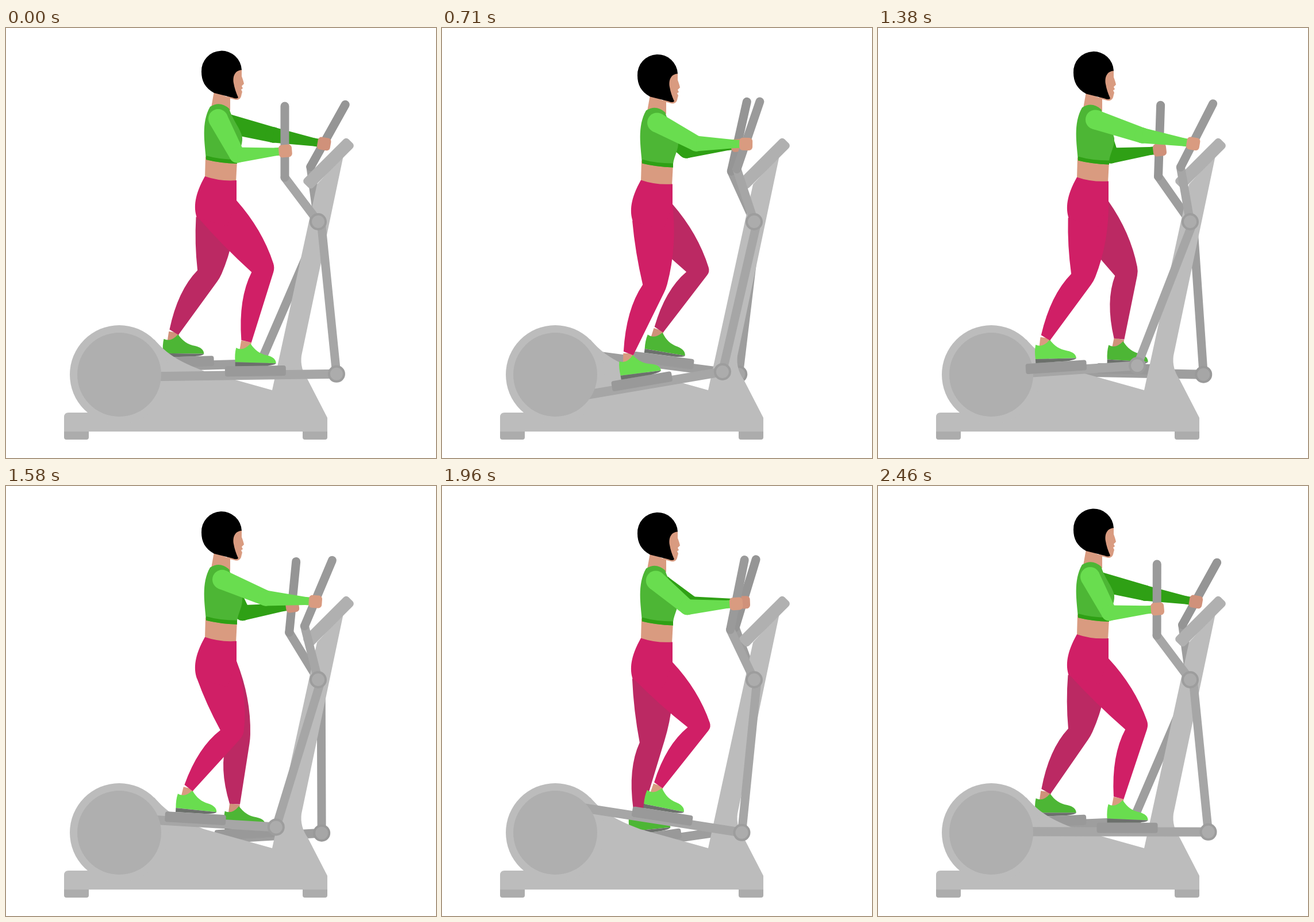
Animation of 748 by 748 pixels, one loop 2.5 s. Source, as an HTML page with a canvas:

```html
<!DOCTYPE html>
<html lang="en">
<head>
<meta charset="utf-8">
<title>Elliptical trainer</title>
<style>
html, body { margin: 0; width: 100%; height: 100%; overflow: hidden; background: #fff; }
canvas { display: block; }
</style>
</head>
<body>
<canvas id="stage" width="748" height="748"></canvas>
<script>
const ctx = document.getElementById('stage').getContext('2d');
const LOOP = 2500, ARM = 266.7, PIVOT = [543, 337], WHEEL = [197, 603];
const TIMES = [0, 330, 710, 1045, 1380, 1750, 2170];

// Poses at TIMES: lever angle (degrees), rod slope, knee and elbow positions.
const near = {
  lever: [6.67, 0.9, -12.1, -20.5, -20.4, -11.4, 1.3],
  slope: [-.014, -.137, -.17, -.15, -.067, .146, .118],
  kneeX: [447, 410, 369, 351, 355, 425, 459],
  kneeY: [421, 442, 450, 437, 434, 425, 416],
  elbowX: [402, 412, 442, 460, 460, 442, 412],
  elbowY: [221, 216, 201, 188, 187, 203, 217],
  shoulderX: [369, 370, 374, 378, 378, 374, 370], shoulderY: 158, reach: -141,
  pants: '#d01f66', shoe: '#69dd4f', sleeve: '#69dd4f', skin: '#d99b80',
  bar: '#a6a6a6', grip: '#9a9a9a', ring: '#9d9d9d', hub: '#acacac'
};
const far = {
  lever: [-22.5, -18.1, -6, 5, 4.8, -3.3, -17],
  slope: [-.03, .06, .13, .09, .02, -.115, -.14],
  kneeX: [352, 396, 445, 453, 432, 381, 353],
  kneeY: [428, 440, 424, 418, 427, 452, 440],
  elbowX: [465, 450, 425, 405, 405, 420, 450],
  elbowY: [186, 193, 213, 221, 222, 217, 194],
  shoulderX: [384, 384, 384, 384, 384, 384, 384], shoulderY: 166, reach: -133,
  pants: '#bb2963', shoe: '#4db635', sleeve: '#2fa015', skin: '#d0917a',
  bar: '#9e9e9e', grip: '#959595', ring: '#999', hub: '#a6a6a6'
};

const SHOE = new Path2D('M-33 -41Q-21 -34 -8 -48C0 -36 8 -30 21 -27Q36 -23 36 -13L-35 -16Q-36 -30 -33 -41Z');
const SOLE = new Path2D('M-35 -16L36 -13Q35 -10 19 -9L-35 -9Z');
const FRAME = new Path2D(
  'M145 669L197 603L258 542C280 567 300 580 345 597L463 630L541 272L587 222L514 570' +
  'Q511 592 525 612L559 678V702H101V677Q101 669 109 669Z');
const FEET = new Path2D('M101 702H144V712Q144 716 140 716H105Q101 716 101 712ZM516 702H559V712Q559 716 555 716H520Q516 716 516 712Z');
const NECK = new Path2D('M362 110L357 138Q372 150 390 143V122Z');
const FACE = new Path2D('M400 70L410 72V84Q413 92 414 97L410 101L412 105L409 107L411 111Q410 114 409 119Q407 125 400 125L385 121L375 90Z');
const HAIR = new Path2D('M340 76A35 35 0 0 1 410 73C398 74 394 84 396 96Q398 108 404 121Q401 124 394 121L362 113C346 104 340 92 340 76Z');
const WAIST = new Path2D('M347 224L402 230L400 268Q370 272 346 260Z');
const SHIRT = new Path2D('M355 137Q372 126 388 140C394 160 408 175 411 190C412 205 404 215 402 230V236Q372 235 348 229C346 200 339 165 355 137Z');
const HEM = new Path2D('M348 222Q372 229 402 229V236Q372 235 348 229Z');
const HIPS = new Path2D('M346 258Q372 267 401 265V301L385 345L332 330C326 312 328 290 346 258Z');

// Smooth cyclic interpolation of values given at TIMES.
function at(values, t) {
  const n = TIMES.length;
  const time = i => TIMES[(i + n) % n] + LOOP * Math.floor(i / n);
  const value = i => values[(i + n) % n];
  const tangent = i => (value(i + 1) - value(i - 1)) / (time(i + 1) - time(i - 1));
  let i = n - 1;
  while (TIMES[i] > t) i--;
  const h = time(i + 1) - time(i), u = (t - time(i)) / h, w = 1 - u;
  return w * w * (1 + 2 * u) * value(i) + u * u * (3 - 2 * u) * value(i + 1) +
    h * u * w * (w * tangent(i) - u * tangent(i + 1));
}

const add = (p, d, k = 1) => [p[0] + d[0] * k, p[1] + d[1] * k];
const mid = (p, q) => [(p[0] + q[0]) / 2, (p[1] + q[1]) / 2];
const unit = (p, q) => {
  const l = Math.hypot(q[0] - p[0], q[1] - p[1]);
  return [(q[0] - p[0]) / l, (q[1] - p[1]) / l];
};
const forward = d => [d[1], -d[0]];
const turn = ([x, y], a, o) =>
  [o[0] + x * Math.cos(a) - y * Math.sin(a), o[1] + x * Math.sin(a) + y * Math.cos(a)];

function fill(path, color) {
  ctx.fillStyle = color;
  ctx.fill(path);
}

function disc([x, y], r, color) {
  ctx.fillStyle = color;
  ctx.beginPath();
  ctx.arc(x, y, r, 0, 7);
  ctx.fill();
}

function line(p, q, width, color, cap = 'round') {
  ctx.strokeStyle = color;
  ctx.lineWidth = width;
  ctx.lineCap = cap;
  ctx.beginPath();
  ctx.moveTo(...p);
  ctx.lineTo(...q);
  ctx.stroke();
}

function block(center, angle, w, h, r, color) {
  ctx.save();
  ctx.translate(...center);
  ctx.rotate(angle);
  ctx.fillStyle = color;
  ctx.beginPath();
  ctx.roundRect(-w / 2, -h / 2, w, h, r);
  ctx.fill();
  ctx.restore();
}

function taper(p, q, r1, r2, color) {
  const n = forward(unit(p, q));
  disc(p, r1, color);
  disc(q, r2, color);
  ctx.beginPath();
  [add(p, n, r1), add(q, n, r2), add(q, n, -r2), add(p, n, -r1)].forEach(c => ctx.lineTo(...c));
  ctx.fill();
}

function pose(side, t, bob) {
  const swing = -at(side.lever, t) * Math.PI / 180;
  const tilt = Math.atan(at(side.slope, t));
  const spot = (x, y) => turn([x, y], swing, PIVOT);
  const joint = spot(1, ARM);
  const pedal = turn([side.reach, -7], tilt, joint);
  return {
    ...side, tilt, joint, pedal, bob,
    top: spot(5, 6), bend: spot(-48.7, -83.2), tip: spot(-34.3, -206.3), hand: spot(-43.4, -128.9),
    ankle: turn([-15, -52], tilt, pedal), heel: turn([-18, -36], tilt, pedal),
    knee: [at(side.kneeX, t), at(side.kneeY, t)],
    elbow: [at(side.elbowX, t), at(side.elbowY, t)],
    shoulder: [at(side.shoulderX, t), side.shoulderY + bob]
  };
}

const drawRod = s => line(s.joint, turn([-315, 0], s.tilt, s.joint), 16, s.bar);
const drawPedal = s => block(s.pedal, s.tilt, 106, 18, 4, '#999');

function drawLever(s) {
  line(s.top, s.joint, 15, s.bar);
  line(PIVOT, s.bend, 15, s.bar);
  line(s.bend, s.tip, 15, s.grip);
  for (const p of [s.joint, PIVOT]) {
    disc(p, 15, s.ring);
    disc(p, 11, s.hub);
  }
}

function drawLeg(s) {
  const { knee, ankle, bob } = s;
  const thigh = unit([367, 306 + bob], knee), shin = unit(knee, ankle);
  const front = [401, 300 + bob], back = [331 + 4 * thigh[0], 329 + bob];
  const n = forward(unit([0, 0], add(thigh, shin))), across = forward(shin);
  const cap = add(knee, n, 21), pit = add(knee, n, -20);
  const instep = add(ankle, across, 9);
  const bulge = add(mid(front, cap), forward(thigh), 14);
  const calf = add(add(pit, [ankle[0] - pit[0], ankle[1] - pit[1]], .42), across, -20);
  const q = (c, p) => ctx.quadraticCurveTo(...c, ...p);

  line(ankle, s.heel, 18, s.skin, 'butt');
  ctx.save();
  ctx.translate(...s.pedal);
  ctx.rotate(s.tilt);
  fill(SHOE, s.shoe);
  fill(SOLE, '#6c706c');
  ctx.restore();

  ctx.fillStyle = s.pants;
  ctx.beginPath();
  ctx.moveTo(...front);
  q(bulge, add(cap, unit(bulge, cap), -8));
  q(cap, add(cap, unit(cap, instep), 8));
  ctx.lineTo(...instep);
  ctx.lineTo(...add(ankle, across, -9));
  q(calf, pit);
  q(add(mid(back, pit), forward(thigh), -4), back);
  ctx.fill();
}

function drawArm(s) {
  const dir = unit(s.elbow, s.hand);
  const wrist = add(s.hand, dir, -16);
  taper(s.shoulder, s.elbow, 17, 13.5, s.sleeve);
  taper(s.elbow, wrist, 13.5, 7, s.sleeve);
  line(wrist, add(s.hand, dir, -9), 14, s.sleeve, 'butt');
  block(add(s.hand, dir), Math.atan2(dir[1], dir[0]), 23, 22, 6, s.skin);
}

function drawTorso(bob) {
  ctx.save();
  ctx.translate(0, bob);
  fill(NECK, '#d99b80');
  fill(FACE, '#d99b80');
  fill(HAIR, '#000');
  fill(WAIST, '#d99b80');
  fill(SHIRT, '#4db635');
  fill(HEM, '#2fa015');
  fill(HIPS, near.pants);
  ctx.restore();
}

function draw(t) {
  const bob = 7.3 * Math.sin(2 * Math.PI * t / LOOP + .12) ** 2;
  const f = pose(far, t, bob), s = pose(near, t, bob);
  ctx.fillStyle = '#fff';
  ctx.fillRect(0, 0, 748, 748);

  drawRod(f);
  drawPedal(f);
  drawLever(f);
  drawLeg(f);
  drawArm(f);

  fill(FEET, '#acacac');
  fill(FRAME, '#bcbcbc');
  disc(WHEEL, 86, '#bcbcbc');
  block([561, 235.5], -Math.PI / 4, 109, 22, 6, '#b0b0b0');
  drawRod(s);
  disc(WHEEL, 73, '#afafaf');
  drawPedal(s);

  drawLeg(s);
  drawTorso(bob);
  drawLever(s);
  drawArm(s);
}

function tick() {
  draw(performance.now() % LOOP);
  requestAnimationFrame(tick);
}
tick();
</script>
</body>
</html>
```
